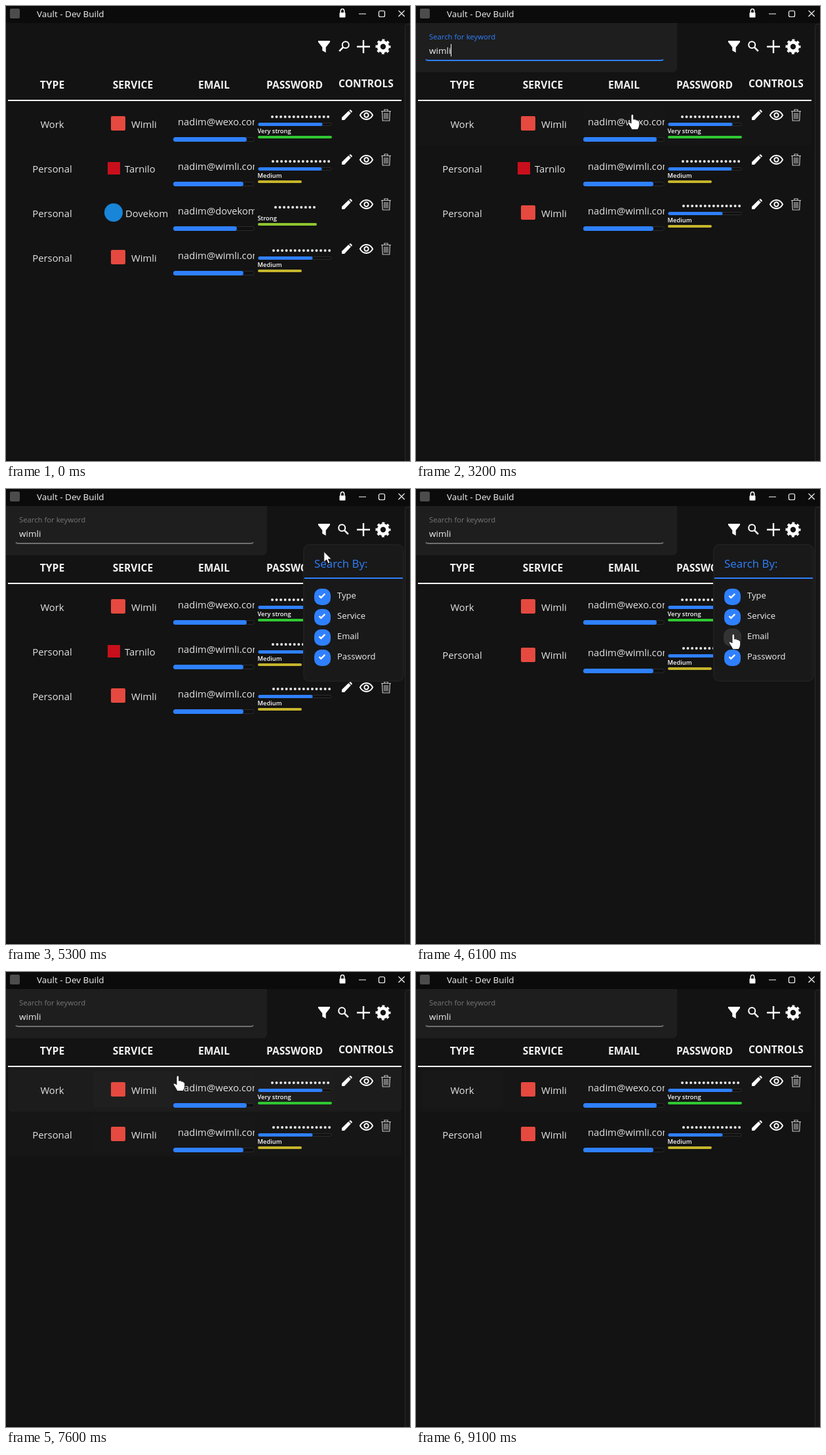
An HTML page for the animation above (9500 ms loop, 616 by 694 pixels).

```html
<!DOCTYPE html>
<html lang="en">
<head>
<meta charset="utf-8">
<title>Vault</title>
<style>
  html, body { margin: 0; width: 100%; height: 100%; overflow: hidden; background: #131313; }
  svg { display: block; }
  #stage { width: 616px; height: 694px; font-family: "Open Sans", "Noto Sans", sans-serif; }
  text { fill: #f2f2f2; white-space: pre; }
  .mid { text-anchor: middle; }
  .head { font-size: 15.6px; font-weight: 700; }
  .cell { font-size: 14.8px; fill: #e2e2e2; }
  .tiny { font-size: 9.3px; font-weight: 600; fill: #fff; }
  .line { fill: none; stroke: #fff; }
</style>
</head>
<body>
<svg id="stage" viewBox="0 0 616 694">
  <defs>
    <g id="pencil" fill="#fff"><path d="M-7.5 7.5v-4L2.8-6.5 6.3-3-3.5 7.5ZM3.8-7.3l.8-.7q1-.7 1.7 0L8-6.3q.7.8 0 1.7l-.8.8Z"/></g>
    <g id="eye" class="line" stroke-width="1.9"><path d="M-9.6 0C-5-8.6 5-8.6 9.6 0 5 8.6-5 8.6-9.6 0Z"/><circle r="3.2"/></g>
    <g id="trash" class="line" style="stroke:#c4c4c4" stroke-width="1.2"><path d="M-7.5-6h15M-2.5-6.3V-8.5h5v2.200M-6-6l.8 14.500H5.2L6-6M-2.5-3.500v9.500M0-3.500v9.500M2.500-3.500v9.500"/></g>
    <g id="arrow"><path d="M0 0V16L4 12.5 6.5 18.3 9 17.2 6.6 11.6H11.5Z"/></g>
    <g id="hand"><path d="M-2 2Q-.2-2 1.7 2V8q3-1.300 3.700 1 2.800-1 3.300 1.200 2-.2 2 2v4q-.2 4.300-2.800 7.300H-.8Q-3 19.500-6.800 13.500-6 10.500-3.200 12.700L-2 14Z"/></g>
    <g id="text"><path d="M-3-6.500h2.200L0-5.800.8-6.500H3M0-6V6M-3 6.500h2.200L0 5.800.8 6.500H3" fill="none" style="stroke:#ddd"/></g>
  </defs>

  <rect width="616" height="694" fill="#131313"/>
  <rect width="616" height="26" fill="#0b0b0b"/>
  <rect y="692" width="616" height="2" fill="#0d0d0d"/>
  <rect x="608.5" y="27.5" width="12" height="680" rx="4" fill="#161616" stroke="#292929"/>

  <g id="search">
    <path d="M0 26H398V93q0 8-8 8H0Z" fill="#1e1e1e"/>
    <text id="label" x="20" y="50.5" font-size="11.3">Search for keyword</text>
    <text id="query" x="20" y="73" font-size="13.5"></text>
    <path id="rule" d="M15 81.5q1 1.500 4 1.500H373q3 0 4-1.500" fill="none"/>
    <path id="caret" class="line" d="M0 58V77"/>
  </g>

  <rect x="6" y="4" width="15" height="15" rx="2" fill="#4c4c4c"/>
  <text x="47" y="17" font-size="13.5">Vault - Dev Build</text>
  <g class="line" stroke-width="1.2">
    <path d="M510.3 10V7.5q0-3 2.700-3t2.700 3V10" stroke-width="1.6"/>
    <rect x="508.5" y="10" width="9" height="7.5" rx="1" fill="#fff" stroke="none"/>
    <path d="M538 12h11M598.5 6.800l9.200 9.200m0-9.200l-9.200 9.200"/>
    <rect x="568.5" y="7.5" width="9" height="9" rx="2"/>
  </g>

  <path id="funnel" d="M-9-9H9V-7L2.7 1V9L-2.7 6V1L-9-7Z" fill="#fff"/>
  <g id="lens" class="line" stroke-width="2"><circle cx="2.3" cy="-2.3" r="5"/><path d="M-1.4 1.400L-7.3 7.300" stroke-width="2.6"/></g>
  <path class="line" d="M535 62h20M545 52v20" stroke-width="2.4"/>
  <g class="line" transform="translate(575 62)">
    <circle r="6.7" stroke-width="5"/>
    <circle r="9.8" stroke-width="3.4" stroke-dasharray="3.85" stroke-dashoffset="1.9"/>
  </g>

  <g class="head mid">
    <text x="70.5" y="126">TYPE</text><text x="193.5" y="126">SERVICE</text>
    <text x="317" y="126">EMAIL</text><text x="440" y="126">PASSWORD</text>
    <text x="549" y="124">CONTROLS</text>
  </g>
  <g id="rows"></g>
  <path d="M3 144H603" stroke="#fff" stroke-width="2"/>

  <g id="menu">
    <rect x="454" y="85" width="152" height="208" rx="9" fill="#191919" stroke="#1f1f1f" stroke-width="2"/>
    <text x="470" y="120" font-size="16.9" style="fill:#2f80ff">Search By:</text>
    <path d="M455 136H605" stroke="#2f80ff" stroke-width="2"/>
  </g>
  <g id="cursor" fill="#fff" stroke="#111" stroke-width=".9"><use/></g>
</svg>
<script>
const LOOP = 9500, STEP = 100, ROW = 68, TOP = 145;
const BLUE = '#2f80ff', WORD = 'wimli';
const $ = id => document.getElementById(id);
const clamp = v => Math.max(0, Math.min(1, v));
const span = (t, from, length) => clamp((t - from) / length);
const smooth = x => x * x * (3 - 2 * x);

const wimli = { name: 'Wimli', x: 191, mark: '<rect x="160" y="23" width="22" height="22" rx="2" fill="#e5493f"/>' };
const tarnilo = { name: 'Tarnilo', x: 181, mark: '<rect x="155" y="25" width="19" height="19" fill="#c80f1b"/>' };
const dovekom = { name: 'Dovekom', x: 182, mark: '<circle cx="164" cy="34" r="14" fill="#1985d8"/>' };
const grades = {
  'Very strong': { width: 113, color: '#2fc832' },
  Strong: { width: 90, color: '#8fc62f' },
  Medium: { width: 67, color: '#c6b52c' }
};
const rows = [
  { type: 'Work', service: wimli, mail: 'nadim@wexo.com', mailBar: 112, dots: 14, dotX: 406, passBar: 98, grade: 'Very strong' },
  { type: 'Personal', service: tarnilo, mail: 'nadim@wimli.com', mailBar: 107, dots: 14, dotX: 407, passBar: 97, grade: 'Medium', leave: 5808 },
  { type: 'Personal', service: dovekom, mail: 'nadim@dovekom.com', mailBar: 97, dots: 10, dotX: 411, grade: 'Strong', leave: 1718 },
  { type: 'Personal', service: wimli, mail: 'nadim@wimli.com', mailBar: 107, dots: 14, dotX: 408, passBar: 83, grade: 'Medium' }
];

// Pointer path: time, x, y
const path = [
  [200, 554, 105], [300, 430, 66], [400, 323.5, 75.5], [2800, 323.5, 75.5], [2900, 335, 88], [3000, 350, 102],
  [3100, 350, 102], [3200, 330, 165], [3400, 250, 235], [3600, 200, 180], [3800, 300, 240], [4000, 380, 200],
  [4200, 450, 160], [4400, 497, 117], [4600, 485, 64], [5200, 485, 64], [5700, 484, 221], [6200, 484, 221],
  [6700, 485, 64], [7100, 485, 64], [7300, 350, 200], [7400, 200, 240], [7500, 200, 185], [7600, 262, 158],
  [7700, 330, 180], [7800, 310, 235], [8100, 227, 229], [8300, 190, 180], [8500, 150, 240], [8700, 60, 170]
];
const menuAt = t => span(t, 4850, 200) * (1 - span(t, 6800, 200));
const shown = t => t >= 200 && t < 8750;

function pointer(t) {
  const i = path.findIndex(p => p[0] > t);
  if (i < 1) return i ? path[path.length - 1].slice(1) : path[0].slice(1);
  const [a, b] = [path[i - 1], path[i]], k = (t - a[0]) / (b[0] - a[0]);
  return [a[1] + (b[1] - a[1]) * k, a[2] + (b[2] - a[2]) * k];
}

// Which row and cell the pointer touches
function hit(t) {
  const [x, y] = pointer(t);
  if (!shown(t) || y < TOP || y >= TOP + 2 * ROW || (menuAt(t) && x > 454)) return [-1, -1];
  return [Math.floor((y - TOP) / ROW), Math.floor((x - 9) / 123.4)];
}

function bar(x, y, width, height, fill) {
  const r = height / 2;
  return `<rect x="${x + .5}" y="${y + .5}" width="${width - 1}" height="${height - 1}" rx="${r}" fill="#101010" stroke="#2c2c2c"/>
    <rect x="${x}" y="${y}" width="${fill}" height="${height}" rx="${r}" fill="${BLUE}"/>`;
}

function rowMarkup(r) {
  const up = r.passBar ? 0 : 3, grade = grades[r.grade];
  const dots = Array.from({ length: r.dots }, (_, i) =>
    `<circle cx="${r.dotX + i * 6.55}" cy="${r.passBar ? 24 : 26}" r="2" fill="#e6e6e6"/>`).join('');
  const cells = [0, 1, 2, 3].map(i =>
    `<rect class="hover" x="${9 + i * 123.4}" y="6" width="123.4" height="56" rx="3" fill="#fff"/>`).join('');
  return `<rect class="red" x="3" width="600" height="68" rx="4" fill="#341919"/>
    <rect class="hover" x="3" width="600" height="68" rx="4" fill="#fff"/>${cells}
    <g class="content">
      <text class="cell mid" x="70.5" y="40.5">${r.type}</text>
      ${r.service.mark}<text class="cell" x="${r.service.x}" y="40.5">${r.service.name}</text>
      <svg x="255" width="124" height="68"><text class="cell" x="7" y="36.5">${r.mail}</text></svg>
      ${bar(255, 55, 124, 7, r.mailBar)}${dots}
      ${r.passBar ? bar(384.5, 33, 112.5, 5, r.passBar) : ''}
      <text class="tiny" x="383.5" y="${49.3 - up}">${r.grade}</text>
      <rect x="384" y="${53 - up}" width="${grade.width}" height="4" rx="2" fill="${grade.color}"/>
      <use href="#pencil" x="519.5" y="21.5"/><use href="#eye" x="549.5" y="21.5"/><use href="#trash" x="579.5" y="21.5"/>
    </g>`;
}

rows.forEach(r => {
  r.el = document.createElementNS('http://www.w3.org/2000/svg', 'g');
  r.el.innerHTML = rowMarkup(r);
  $('rows').append(r.el);
  r.red = r.el.querySelector('.red');
  r.hover = [...r.el.querySelectorAll('.hover')];
  r.content = r.el.querySelector('.content');
});
$('menu').innerHTML += ['Type', 'Service', 'Email', 'Password'].map((name, i) => `
  <g transform="translate(482.5 ${164.5 + 31 * i})">
    <rect class="box" x="-12.5" y="-12.5" width="25" height="25" rx="10" fill="${BLUE}"/>
    <path class="line tick" d="M-5-1.500l2.800 2.800 6-6" stroke-width="2.4"/>
    <text x="22.5" y="2.5" font-size="13">${name}</text>
  </g>`).join('');
const box = document.querySelectorAll('.box')[2], tick = document.querySelectorAll('.tick')[2];

function drawRows(t) {
  const past = Array.from({ length: 10 }, (_, i) => hit(t - i * 50));
  const share = test => past.filter(test).length / past.length;
  let y = TOP, index = 0;
  for (const r of rows) {
    const x = r.leave ? span(t, r.leave, 357) : 0, height = ROW * (1 - smooth(x));
    const squash = 1 - x, mid = y + height / 2;
    r.el.setAttribute('transform', `translate(0 ${mid - 34 * squash}) scale(1 ${squash})`);
    r.el.setAttribute('opacity', clamp(1 - (x / .8) ** 1.5));
    r.red.setAttribute('opacity', x ? 1 : 0);
    r.content.setAttribute('transform', `translate(${-4.7 * x} 0) scale(${1 + .025 * x} 1)`);
    const at = index;
    r.hover.forEach((el, i) => el.setAttribute('opacity', x ? 0 :
      i ? .04 * share(h => h[0] === at && h[1] === i - 1) : .065 * share(h => h[0] === at)));
    y += height;
    if (x < 1) index++;
  }
}

function drawSearch(t) {
  const open = span(t, 880, 400), focus = t < 4900;
  const search = $('search');
  search.setAttribute('visibility', t >= 1000 ? 'visible' : 'hidden');
  search.setAttribute('transform', `translate(0 ${-75 * (1 - open) ** 3})`);
  $('label').style.fill = focus ? BLUE : '#777';
  $('rule').setAttribute('stroke', focus ? BLUE : '#707070');
  $('rule').setAttribute('stroke-width', 2);
  const query = $('query');
  query.textContent = WORD.slice(0, Math.max(0, Math.floor((t - 1700) / 100)));
  const x = 20.5 + (query.textContent ? query.getComputedTextLength() : 0);
  const lit = focus && (t < 2200 || Math.floor((t - 2200) / 500) % 2 === 0);
  $('caret').setAttribute('transform', `translate(${Math.floor(x) + .5} 0)`);
  $('caret').setAttribute('opacity', lit ? 1 : 0);
  $('lens').setAttribute('transform', `translate(${515.5 - open} 61.5) rotate(${-90 * open})`);
}

function drawPointer(t) {
  const [x, y] = pointer(t), menu = menuAt(t);
  const onFunnel = Math.abs(x - 485) < 11 && Math.abs(y - 62) < 11;
  const onBox = menu && Math.abs(x - 483) < 14 && y > 152 && y < 270;
  const kind = onFunnel || onBox || hit(t)[0] >= 0 ? 'hand'
    : t >= 1100 && x < 378 && y > 55 && y < 85 ? 'text' : 'arrow';
  const cursor = $('cursor');
  cursor.firstElementChild.setAttribute('href', '#' + kind);
  cursor.setAttribute('transform', `translate(${x} ${y})`);
  cursor.setAttribute('visibility', shown(t) ? 'visible' : 'hidden');
  $('funnel').setAttribute('transform', `translate(485 62) scale(${onFunnel && shown(t) ? 1.15 : 1})`);
}

function draw(t) {
  drawRows(t);
  drawSearch(t);
  drawPointer(t);
  $('menu').setAttribute('opacity', menuAt(t));
  const off = t >= 5900;
  box.setAttribute('fill', off ? '#333' : BLUE);
  box.setAttribute('transform', `scale(${off && t < 6300 ? 1.08 : 1})`);
  tick.setAttribute('opacity', off ? 0 : 1);
}

const start = performance.now();
function nextFrame() {
  const t = (performance.now() - start) % LOOP;
  draw(Math.floor(t / STEP) * STEP);
  requestAnimationFrame(nextFrame);
}
nextFrame();
</script>
</body>
</html>
```
